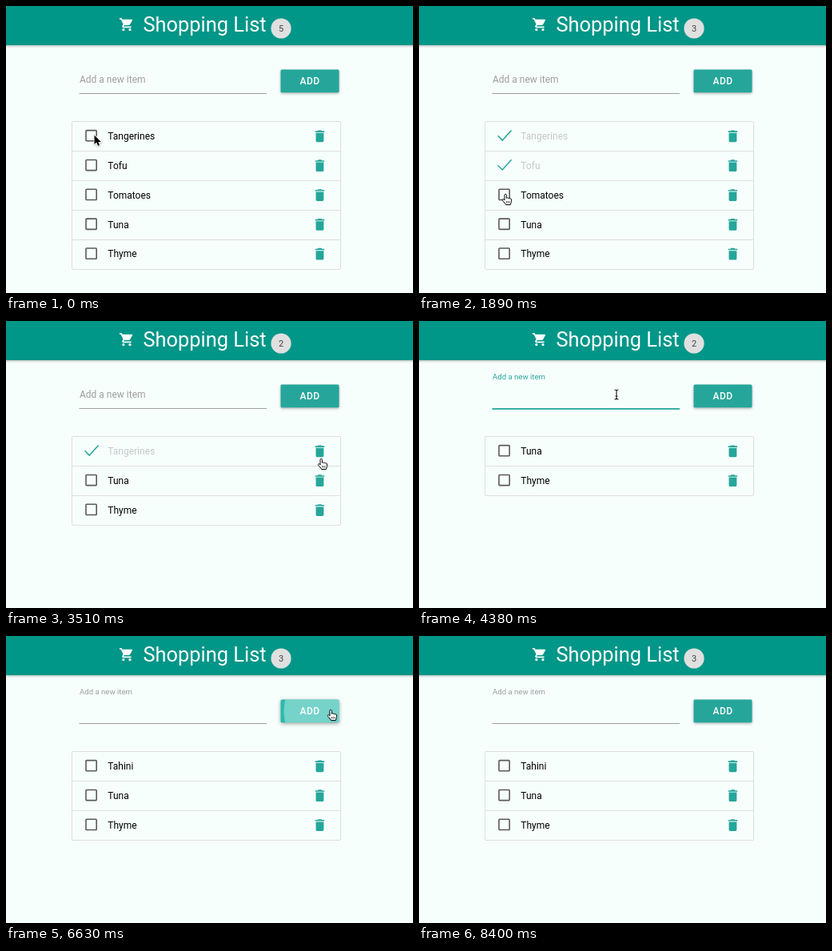
Write an HTML page with a canvas that moves like this. It is 509 px wide and 359 px high and loops after 8430 ms.

```html
<!DOCTYPE html>
<html lang="en">
<head>
<meta charset="utf-8">
<title>Shopping List</title>
<style>
  html, body { margin: 0; width: 100%; height: 100%; overflow: hidden; background: #f7fffd; }
  canvas { display: block; width: 509px; height: 359px; }
</style>
</head>
<body>
<canvas id="stage"></canvas>
<script>
const W = 509, H = 359, LOOP = 8430, STEP = 30;
const TEAL = [38, 166, 154], TEAL_HOVER = [43, 187, 173], GREY = [158, 158, 158];
const FONT = 'Roboto, Arial, sans-serif';
const ROW = 37, LIST_TOP = 144;

const canvas = document.getElementById('stage');
const ctx = canvas.getContext('2d');
const ratio = window.devicePixelRatio || 1;
canvas.width = W * ratio;
canvas.height = H * ratio;

const CART = new Path2D('M7 18c-1.1 0-1.99.9-1.99 2S5.9 22 7 22s2-.9 2-2-.9-2-2-2zM1 2v2h2l3.6 7.59-1.35 2.45c-.16.28-.25.61-.25.96 0 1.1.9 2 2 2h12v-2H7.42c-.14 0-.25-.11-.25-.25l.03-.12.9-1.63h7.45c.75 0 1.41-.41 1.75-1.03l3.58-6.49c.08-.14.12-.31.12-.48 0-.55-.45-1-1-1H5.21l-.94-2H1zm16 16c-1.1 0-1.99.9-1.99 2s.89 2 1.99 2 2-.9 2-2-.9-2-2-2z');
const TRASH = new Path2D('M6 19c0 1.1.9 2 2 2h8c1.1 0 2-.9 2-2V7H6zM19 4h-3.5l-1-1h-5l-1 1H5v2h14z');
const ARROW = new Path2D('M0 0V11.6L2.7 9.1 4.6 13.4 6.6 12.5 4.8 8.4H8.4Z');
const HAND = new Path2D('M3.4 8V1.5a1.2 1.2 0 0 1 2.4 0V5.4c.2-.9 2.2-.8 2.2.3c.3-.8 2.1-.6 2.1.5c.4-.6 1.8-.3 1.8.8V9.3c0 1.5-1 2.4-1.2 4.2H5C4.6 12 2.2 10 .9 8.2C.2 7 1.5 6.2 2.3 6.8Z');

// Moments of the story, in ms
const FOCUS = 4080, TYPING = 4830, SHOW = 5960, PRESS = 6420, ADDED = 6510;
const LEAVE = 7950, GONE = 8085;

const ITEMS = [
  { name: 'Tahini', from: ADDED },
  { name: 'Tangerines', check: 510, until: 3660 },
  { name: 'Tofu', check: 1230, until: 3150 },
  { name: 'Tomatoes', check: 2070, until: 2760 },
  { name: 'Tuna' },
  { name: 'Thyme' }
];
const KEYS = [4830, 4950, 5100, 5250, 5400, 5550];

// Pointer: time, x, y
const TRAIL = [
  [0, 110.5, 161.5], [180, 107, 160], [720, 107, 160], [1050, 107, 198], [1440, 107, 198],
  [1800, 108, 235], [2190, 108, 235], [2620, 392, 235], [2850, 392, 235], [3060, 393, 199],
  [3240, 393, 199], [3510, 394, 172], [3600, 393, 165], [3720, 393, 165], [4050, 247, 92],
  [SHOW, 247, 92], [6330, 406, 92], [7220, 406, 92], [7800, 412, 104], [GONE, 489, 147]
];

const clamp = v => Math.max(0, Math.min(1, v));
const phase = (t, start, length) => clamp((t - start) / length);
const easeOut = p => 1 - (1 - p) * (1 - p);
const smooth = p => p * p * (3 - 2 * p);
const mix = (a, b, p) => a + (b - a) * p;
const rgb = (a, b = a, p = 0) => `rgb(${a.map((v, i) => Math.round(mix(v, b[i], p)))})`;

function text(str, x, y, size, color, weight = 400) {
  ctx.font = `${weight} ${size}px ${FONT}`;
  ctx.fillStyle = color;
  ctx.fillText(str, x, y);
}

function icon(path, x, y, scale, color) {
  ctx.save();
  ctx.translate(x, y);
  ctx.scale(scale, scale);
  ctx.fillStyle = color;
  ctx.fill(path);
  ctx.restore();
}

function shadow(color, blur, dy) {
  ctx.shadowColor = color;
  ctx.shadowBlur = blur * ratio;
  ctx.shadowOffsetY = dy * ratio;
}

function pointerAt(t) {
  let i = 0;
  while (i < TRAIL.length - 2 && t >= TRAIL[i + 1][0]) i++;
  const [t0, x0, y0] = TRAIL[i], [t1, x1, y1] = TRAIL[i + 1];
  const p = smooth(phase(t, t0, t1 - t0));
  return [mix(x0, x1, p), mix(y0, y1, p)];
}

function drawHeader(t) {
  ctx.save();
  shadow('rgba(0,0,0,.3)', 3, 1);
  ctx.fillStyle = '#009688';
  ctx.fillRect(-5, -5, W + 10, 54);
  ctx.restore();
  icon(CART, 141.2, 13.4, 0.81, '#fff');
  text('Shopping List', 171.5, 31.5, 25.4, '#fff');

  const left = ITEMS.filter(it => t >= (it.from || 0) && !(t >= it.check)).length;
  ctx.fillStyle = '#e0e0e0';
  ctx.beginPath();
  ctx.arc(344, 28, 12.6, 0, 7);
  ctx.fill();
  ctx.textAlign = 'center';
  text(String(left), 344, 32, 11, '#424242');
  ctx.textAlign = 'left';
}

function drawInput(t) {
  const lift = easeOut(phase(t, FOCUS, 180));
  const glow = lift * (1 - phase(t, PRESS, 150));
  const tint = rgb(GREY, TEAL, glow);
  text('Add a new item', 92, mix(95.5, 73, lift), mix(12, 9.6, lift), tint);
  ctx.fillStyle = tint;
  ctx.fillRect(91.5, 109, 234.5, 1 + glow * 0.8);

  const typed = t < ADDED ? 'Tahini'.slice(0, KEYS.filter(k => t >= k).length) : '';
  text(typed, 92, 95.5, 12, '#000');
  const blink = t < TYPING ? (t < 4380 || t >= 4680) : (t < 5850 || t >= 6150);
  if (t >= FOCUS && t < PRESS && blink) {
    ctx.fillStyle = '#222';
    ctx.fillRect(Math.round(92 + ctx.measureText(typed).width), 85, 1, 14);
  }
}

function drawButton(t) {
  const hover = phase(t, 6240, 150) * (1 - phase(t, LEAVE, 450));
  const shape = new Path2D();
  shape.roundRect(343.5, 79.5, 73, 28.7, 1.5);

  ctx.save();
  shadow(`rgba(0,0,0,${mix(0.32, 0.4, hover)})`, mix(3.5, 5, hover), 1.4);
  ctx.fillStyle = rgb(TEAL, TEAL_HOVER, hover);
  ctx.fill(shape);
  ctx.restore();

  if (t >= PRESS && t < 6885) {
    const fade = phase(t, ADDED, 375);
    ctx.save();
    ctx.clip(shape);
    ctx.fillStyle = `rgba(255,255,255,${0.39 * (1 - fade * fade)})`;
    ctx.beginPath();
    ctx.arc(406, 94, 78 * easeOut(phase(t, PRESS, 420)), 0, 7);
    ctx.fill();
    ctx.restore();
  }
  ctx.letterSpacing = '0.5px';
  text('ADD', 367.5, 98.3, 12, '#fff', 500);
  ctx.letterSpacing = '0px';
}

function drawCheck(y, p) {
  if (p < 1) {
    ctx.globalAlpha = 1 - p;
    ctx.strokeStyle = '#5a5a5a';
    ctx.lineWidth = 1.6;
    ctx.beginPath();
    ctx.roundRect(100, y - 7.2, 13.2, 13.2, 0.8);
    ctx.stroke();
    ctx.globalAlpha = 1;
  }
  if (p > 0) {
    const tip = clamp(p * 2), tail = clamp(p * 2 - 1);
    ctx.strokeStyle = rgb(TEAL);
    ctx.lineWidth = 1.5;
    ctx.beginPath();
    ctx.moveTo(98.6, y - 0.5);
    ctx.lineTo(98.6 + 5.6 * tip, y - 0.5 + 5.8 * tip);
    if (tail) ctx.lineTo(104.2 + 11.4 * tail, y + 5.3 - 12.6 * tail);
    ctx.stroke();
  }
}

function drawList(t) {
  const rows = ITEMS.filter(it => t >= (it.from || 0) && !(t >= it.until));
  ctx.strokeStyle = '#dedfdf';
  ctx.lineWidth = 1;
  ctx.beginPath();
  ctx.roundRect(82.5, LIST_TOP + 0.5, 336, rows.length * ROW, 1.5);
  for (let i = 1; i < rows.length; i++) {
    ctx.moveTo(83, LIST_TOP + 0.5 + i * ROW);
    ctx.lineTo(418, LIST_TOP + 0.5 + i * ROW);
  }
  ctx.stroke();

  rows.forEach((it, i) => {
    const y = 162.8 + i * 36.85;
    const p = it.check ? phase(t, it.check, 120) : 0;
    drawCheck(y, p);
    text(it.name, 127.3, Math.round(y + 4.2), 12, rgb([0, 0, 0], [196, 200, 199], p));
    icon(TRASH, 382.6, y - 9.8, 0.82, rgb(TEAL));
  });
  return rows.length;
}

function pointerKind(t, x, y, rows) {
  if (t < 90) return 'arrow';
  if (x > 91 && x < 326 && y > 78 && y < 111) return 'beam';
  if (x > 343 && x < 417 && y > 79 && y < 109) return 'hand';
  const inRow = y > LIST_TOP && y < LIST_TOP + rows * ROW &&
    Math.abs((y - LIST_TOP) % ROW - 18.5) < 11;
  const onControl = (x > 97 && x < 188) || (x > 382 && x < 402);
  return inRow && onControl ? 'hand' : 'arrow';
}

function drawPointer(t, rows) {
  if ((t >= TYPING && t < SHOW) || t >= GONE) return;
  const [x, y] = pointerAt(t);
  const kind = pointerKind(t, x, y, rows);
  ctx.save();
  ctx.translate(x, y);
  ctx.lineJoin = 'round';
  if (kind === 'beam') {
    ctx.strokeStyle = '#111';
    ctx.lineWidth = 1.1;
    ctx.stroke(new Path2D('M-2.5-6Q-.2-6 0-4.6Q.2-6 2.5-6M0-4.6V4.6M-2.5 6Q-.2 6 0 4.6Q.2 6 2.5 6M-1.4 2H1.4'));
  } else if (kind === 'hand') {
    ctx.translate(-4.4, 0);
    shadow('rgba(0,0,0,.25)', 2, 1);
    ctx.fillStyle = '#fff';
    ctx.fill(HAND);
    ctx.shadowColor = 'transparent';
    ctx.strokeStyle = '#111';
    ctx.lineWidth = 1;
    ctx.stroke(HAND);
    ctx.lineWidth = 0.7;
    ctx.stroke(new Path2D('M5.8 9V11.6M7.6 9V11.6M9.4 9V11.6'));
  } else {
    shadow('rgba(0,0,0,.25)', 2, 1);
    ctx.strokeStyle = '#fff';
    ctx.lineWidth = 1.8;
    ctx.stroke(ARROW);
    ctx.shadowColor = 'transparent';
    ctx.fillStyle = '#000';
    ctx.fill(ARROW);
  }
  ctx.restore();
}

function draw(t) {
  ctx.setTransform(ratio, 0, 0, ratio, 0, 0);
  ctx.fillStyle = '#f7fffd';
  ctx.fillRect(0, 0, W, H);
  drawHeader(t);
  drawInput(t);
  drawButton(t);
  drawPointer(t, drawList(t));
}

const start = performance.now();
function tick() {
  const t = (performance.now() - start) % LOOP;
  draw(Math.floor(t / STEP) * STEP);
  requestAnimationFrame(tick);
}
tick();
</script>
</body>
</html>
```
